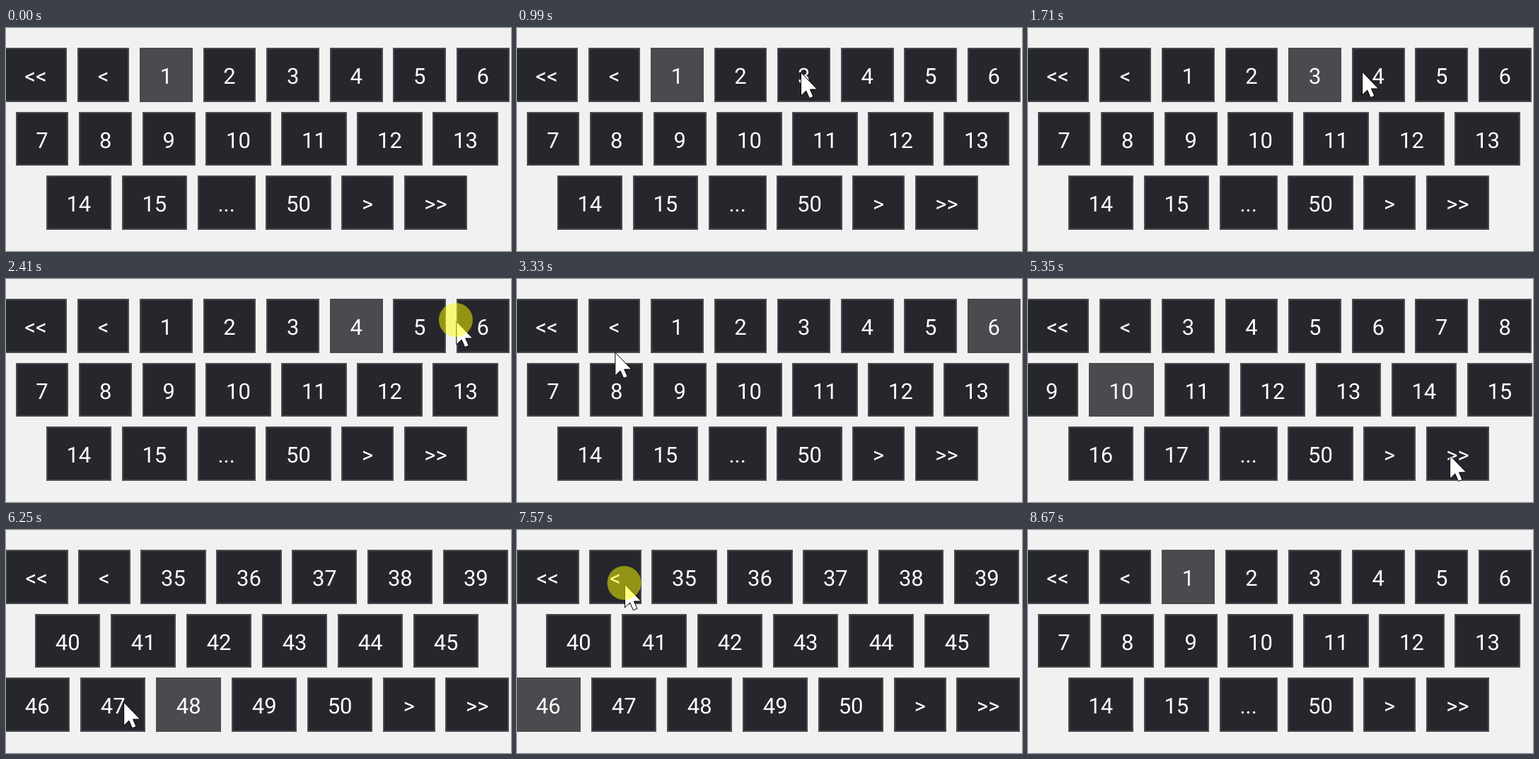
Animation of 714x316 px, one loop 9.47 s. Source, as an HTML page:

```html
<!DOCTYPE html>
<html lang="en">
<head>
<meta charset="utf-8">
<title>Pagination</title>
<style>
  html, body { margin: 0; width: 100%; height: 100%; overflow: hidden; background: #f1f1f1; }
  #stage { position: absolute; left: 0; top: 0; width: 714px; height: 316px; overflow: hidden; }
  #pager {
    position: absolute; left: -7.4px; top: 28.3px; width: 724px;
    display: flex; flex-wrap: wrap; justify-content: center; gap: 13.85px 14.75px;
    font: 31px Roboto, sans-serif; text-rendering: geometricPrecision; color: #fff;
  }
  #pager span {
    box-sizing: border-box; height: 76.6px; padding: 0 26.7px; line-height: 78px;
    flex: none; white-space: nowrap; background: #26272c; border: 2px solid #4a4a4f;
  }
  #pager .active { background: #4a4a4f; }
  #overlay { position: absolute; left: 0; top: 0; }
</style>
</head>
<body>
<div id="stage">
  <div id="pager"></div>
  <svg id="overlay" width="714" height="316">
    <g id="cursor">
      <path d="M.5 0V33L7.7 26L12.4 36.6L18 34.4L13.4 24H23.5Z" fill="#fff" stroke="#000"/>
      <circle id="click" cx="-.5" cy="-2" r="24" fill="#ff0" fill-opacity=".5"/>
    </g>
  </svg>
</div>
<script>
const LOOP = 9470, STEP = 100, TRAVEL = 400;
const LAST = 50, WINDOW = 15;
const OFFSTAGE = [529, 430];

// Each visit clicks a button; the page turns at `turn`, then the pointer
// rests and leaves for the next one. `bend` bows the way there.
const visits = [
  { label: 3, at: [401, 63], turn: 1410 },
  { label: 4, at: [472, 62], turn: 2210 },
  { label: 6, at: [639, 60], turn: 2730, rest: 400 },
  { label: 9, at: [213, 155], turn: 4030, rest: 300, bend: [-115, -70] },
  { label: '>', at: [513, 250], turn: 5250, bend: [-55, 33] },
  { label: '>>', at: [608, 250], turn: 5750 },
  { label: 48, at: [239, 243], turn: 6250 },
  { label: 47, at: [113, 245], turn: 6950 },
  { label: '<', at: [152, 77], turn: 7470 },
  { label: '<', at: [152, 77], turn: 7870 },
  { label: '<<', at: [32, 53], turn: 8270 },
  { at: OFFSTAGE, turn: LOOP }
];

const follow = {
  '<<': () => 1,
  '<': page => page - 1,
  '>': page => page + 1,
  '>>': () => LAST
};
const byId = id => document.getElementById(id);
const pager = byId('pager'), cursor = byId('cursor'), click = byId('click');
const easeOut = u => 1 - (1 - u) ** 3;

// Chain the visits: where each starts, when it leaves and on which page.
let from = OFFSTAGE, leave = 290, page = 1;
for (const visit of visits) {
  Object.assign(visit, { from, leave, page });
  from = visit.at;
  leave = visit.turn + (visit.rest || 0);
  page = follow[visit.label]?.(page) ?? visit.label;
}

let shown = 0;
function showPage(active) {
  if (active === shown) return;
  shown = active;
  const first = Math.max(1, Math.min(active - 7, LAST - WINDOW));
  const numbers = Array.from({ length: WINDOW }, (_, i) => first + i);
  const dots = first + WINDOW < LAST ? ['...'] : [];
  const labels = ['<<', '<', ...numbers, ...dots, LAST, '>', '>>'];
  pager.replaceChildren(...labels.map(label => {
    const button = document.createElement('span');
    button.textContent = label;
    if (label === active) button.className = 'active';
    return button;
  }));
}

function pointerAt(t, { from, at, leave, bend = [0, 0] }) {
  const steps = Math.floor((t - leave) / STEP) + 1;
  const u = Math.max(0, Math.min(1, steps * STEP / TRAVEL));
  return from.map((start, i) =>
    start + (at[i] - start) * easeOut(u) + bend[i] * Math.sin(Math.PI * u));
}

function draw(t) {
  const visit = visits.find(({ turn }) => t < turn);
  const untilTurn = visit.turn - t;
  const pressed = visit.label && untilTurn <= 320 && untilTurn > 200;
  showPage(visit.page);
  cursor.setAttribute('transform', `translate(${pointerAt(t, visit)})`);
  click.setAttribute('visibility', pressed ? 'visible' : 'hidden');
}

const origin = performance.now();
function tick() {
  draw((performance.now() - origin) % LOOP);
  requestAnimationFrame(tick);
}
tick();
</script>
</body>
</html>
```
